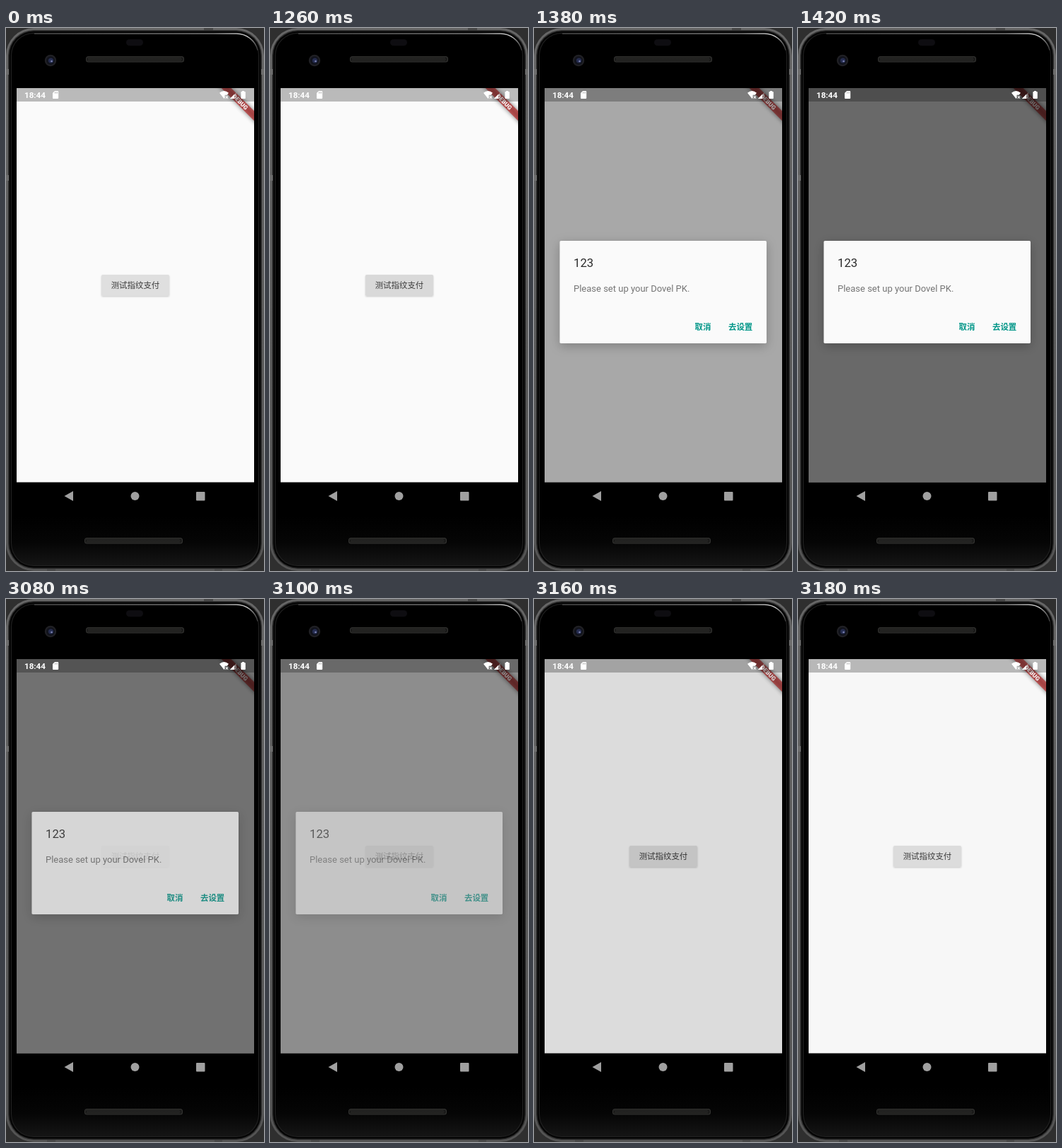
These frames come from a looping animation (365x768 px, 3940 ms). An HTML page with a canvas:

```html
<!DOCTYPE html>
<html lang="zh-CN">
<head>
<meta charset="utf-8">
<title>Dialog</title>
<style>
  html, body { margin: 0; width: 100%; height: 100%; overflow: hidden; background: #2f2f2f; }
  canvas, svg { position: absolute; left: 0; top: 0; width: 365px; height: 768px; display: block; }
  text { font-family: Roboto, sans-serif; white-space: pre; }
  .zh { font-family: "Noto Sans CJK SC", "Noto Sans CJK", sans-serif; font-size: 11.44px; }
  .action { fill: #009688; font-weight: 700; }
</style>
</head>
<body>
<canvas id="phone"></canvas>
<svg viewBox="0 0 365 768">
  <defs>
    <clipPath id="screen"><rect x="15" y="85" width="336" height="557.5"/></clipPath>
    <filter id="soft" x="-30%" y="-150%" width="160%" height="400%"><feGaussianBlur stdDeviation="3.6"/></filter>
    <filter id="low" x="-10%" y="-30%" width="120%" height="170%">
      <feDropShadow dx="0" dy="1" stdDeviation=".9" flood-opacity=".2"/>
    </filter>
    <filter id="high" x="-15%" y="-25%" width="130%" height="160%">
      <feDropShadow dx="0" dy="4" stdDeviation="7.5" flood-opacity=".24"/>
    </filter>
  </defs>

  <g clip-path="url(#screen)">
    <rect x="15" y="85" width="336" height="558" fill="#fafafa"/>
    <rect id="button" x="135" y="349" width="96" height="30" rx="1.7" filter="url(#low)"/>
    <text class="zh" x="148.7" y="368" fill="#3a3a3a">测试指纹支付</text>
    <g transform="translate(351 85) rotate(45) scale(.817)">
      <rect x="-60" y="28" width="120" height="12" opacity=".5" filter="url(#soft)"/>
      <rect x="-60" y="28" width="120" height="12" fill="#b71c1c" fill-opacity=".63"/>
      <text y="37.6" font-size="10.2" font-weight="900" text-anchor="middle" fill="#fff">DEBUG</text>
    </g>
    <rect x="15" y="85" width="336" height="19" opacity=".26"/>
    <rect id="dim" x="15" y="85" width="336" height="558"/>
  </g>

  <g fill="#fff">
    <text x="26" y="99" font-size="11.6" font-weight="700">18:44</text>
    <path d="M69 89H73.2Q74.2 89 74.2 90V99Q74.2 100 73.2 100H67Q66 100 66 99V92Z"/>
    <path d="M69.3 90.5V92.5M71 90.5V92.5M72.7 90.5V92.5" stroke="#999" stroke-width=".7"/>
    <path d="M308.5 100L302 91.8Q308.5 86.2 315 91.8L312.6 94.8H309.6V98.7Z"/>
    <path d="M310.8 96L314 99.6M314 96L310.8 99.6" stroke="#fff" stroke-width="1.1"/>
    <path d="M316.8 100L325.8 91V100Z" fill-opacity=".3"/>
    <path d="M316.8 100L323 93.8V100Z"/>
    <path d="M334 89H337V90H338Q338.8 90 338.8 90.8V99.2Q338.8 100 338 100H333.2Q332.4 100 332.4 99.2V90.8Q332.4 90 333.2 90H334Z"/>
  </g>

  <g id="dialog" clip-path="url(#screen)">
    <rect x="36.5" y="301" width="292.5" height="145" rx="1.7" fill="#fafafa" filter="url(#high)"/>
    <text x="56" y="338" font-size="16.7" fill="#2c2c2c">123</text>
    <text x="56" y="373" font-size="13" fill="#757575">Please set up your Dovel PK.</text>
    <text class="zh action" x="227.6" y="427">取消</text>
    <text class="zh action" x="275" y="427">去设置</text>
  </g>
</svg>
<script>
const LOOP = 3940, STEP = 20, W = 365, H = 768;
const $ = id => document.getElementById(id);

// Keys are [time in ms, opacity].
const DIM = [[1300, 0], [1320, .03], [1380, .33], [1420, .575], [3073, .575], [3080, .545], [3140, .23], [3180, .01], [3200, 0]];
const DIALOG = [[1300, 0], [1320, .4], [1340, .75], [1380, 1], [3057, 1], [3080, .74], [3140, .07], [3150, 0]];

function sample(keys, t) {
  const i = keys.findIndex(k => k[0] > t);
  if (i === 0) return keys[0][1];
  if (i < 0) return keys[keys.length - 1][1];
  const [t0, a] = keys[i - 1], [t1, b] = keys[i];
  return a + (b - a) * (t - t0) / (t1 - t0);
}

function drawPhone() {
  const canvas = $('phone'), c = canvas.getContext('2d');
  const dpr = window.devicePixelRatio || 1;
  canvas.width = W * dpr;
  canvas.height = H * dpr;
  c.scale(dpr, dpr);

  const box = (x, y, w, h, color) => { c.fillStyle = color; c.fillRect(x, y, w, h); };
  const fillRound = (x, y, w, h, r, color) => {
    c.beginPath();
    c.roundRect(x, y, w, h, r);
    c.fillStyle = color;
    c.fill();
  };
  const inset = (d, color) => fillRound(d, d, W - 2 * d, H - 2 * d, 39 - d, color);
  const disc = (x, y, r, color) => {
    c.beginPath();
    c.arc(x, y, r, 0, Math.PI * 2);
    c.fillStyle = color;
    c.fill();
  };
  const fade = (x0, y0, x1, y1, ...stops) => {
    const g = c.createLinearGradient(x0, y0, x1, y1);
    stops.forEach(([p, color]) => g.addColorStop(p, color));
    return g;
  };

  // Body and metal rim
  box(0, 0, W, H, '#2f2f2f');
  inset(0, fade(0, 0, 0, H, [0, '#666'], [.5, '#5c5c5c'], [1, '#545454']));
  inset(3, '#303030');
  for (const [x, y] of [[0, 58], [W - 4, 58], [0, 208]]) box(x, y, 4, 8, '#6c6c6c');
  for (const [x, y, w] of [[280, 0, 13], [58, H - 3, 12], [295, H - 3, 11]]) box(x, y, w, 3, '#484848');

  // Glass
  inset(4.5, '#050505');
  inset(7, '#222');
  inset(8, fade(0, 690, 0, 764, [0, '#000'], [.5, '#050505'], [1, '#171717']));
  c.beginPath();
  c.moveTo(40, 8);
  c.lineTo(326, 8);
  c.arc(326, 39, 31, -Math.PI / 2, -.25);
  c.strokeStyle = fade(40, 0, 357, 0, [0, '#444'], [.8, '#777'], [.95, '#ccc'], [1, '#333']);
  c.lineWidth = 1.4;
  c.stroke();

  // Sensor, camera and speakers
  fillRound(170, 16, 24, 9, 4.5, '#0e0d11');
  disc(63, 46, 8.2, '#202024');
  disc(63, 46, 6, '#11131c');
  disc(63.5, 46, 3.6, '#262d50');
  disc(64.5, 47, 1.3, '#7d84b4');
  for (const [x, y] of [[113, 40], [111, 721]]) {
    fillRound(x, y, 139, 8.6, 3.5, '#343432');
    fillRound(x + 1, y + 1, 137, 6.6, 2.8, '#1b1b1a');
    for (let i = 0; i < 66; i++)
      for (let j = 0; j < 3; j++) box(x + 3 + i * 2 + j % 2, y + 2 + j * 1.7, 1, 1, '#353533');
  }

  // Navigation keys
  c.beginPath();
  c.moveTo(82.5, 662);
  c.lineTo(95, 655);
  c.lineTo(95, 669);
  c.fillStyle = '#a0a0a0';
  c.fill();
  disc(182.5, 662, 6, '#a0a0a0');
  fillRound(269, 656, 12.5, 12.5, 1, '#a0a0a0');
}

function render(now) {
  const t = Math.floor(now % LOOP / STEP) * STEP;
  $('dim').setAttribute('opacity', sample(DIM, t));
  $('dialog').setAttribute('opacity', sample(DIALOG, t));
  const pressed = t >= 1260 && t < 1420;
  $('button').setAttribute('fill', pressed ? '#d9d9d9' : '#dfdfdf');
}

drawPhone();
const start = performance.now();
function tick() {
  render(performance.now() - start);
  requestAnimationFrame(tick);
}
tick();
</script>
</body>
</html>
```
